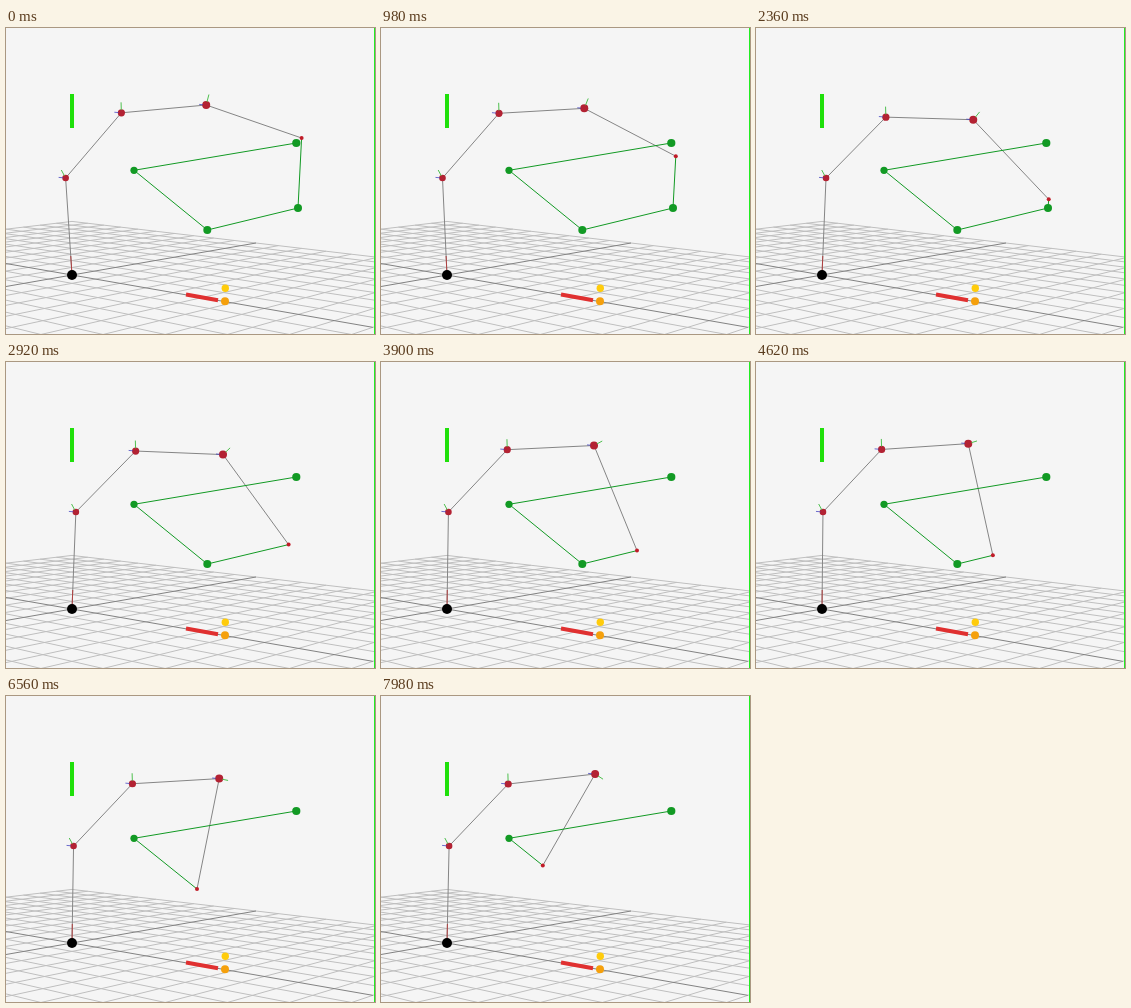
These frames come from a looping animation (369 by 306 pixels, 8 s). An HTML page with a canvas:

```html
<!DOCTYPE html>
<html lang="en">
<head>
<meta charset="utf-8">
<title>Robot arm following a path</title>
<style>
  html, body { margin: 0; width: 100%; height: 100%; overflow: hidden; background: #f5f5f5; }
  canvas { display: block; }
</style>
</head>
<body>
<canvas id="stage" width="369" height="306"></canvas>
<script>
const ctx = document.getElementById('stage').getContext('2d');
const LOOP = 8000;
const BASE = [66, 247];
const GREEN = '#129a24';
const JOINT = '#b32233';

// Ground plane: half size 1, seen along its diagonal.
const DEPTH = 4.15, HORIZON = 82.2, SCALE_X = 947.6, SCALE_Y = 684, CELLS = 10;

// Path corners, with the step at which the tip passes each one.
const path = [
  { at: 47, p: [292, 180], r: 4 },
  { at: 120.5, p: [201.3, 202], r: 4 },
  { at: Infinity, p: [128, 142.3], r: 3.6 },
  { at: Infinity, p: [290.3, 115], r: 4.1 }
];

// Step, tip x, tip y, wrist x, wrist y.
const poses = [
  [0, 295.6, 110, 200.2, 77],
  [28, 293.7, 152.5, 211, 85.6],
  [47, 292.3, 180, 220.8, 94.8],
  [53, 282.6, 182.6, 217, 92.6],
  [74, 256, 188.6, 213, 83.5],
  [106, 217.7, 198, 212.5, 83],
  [120.5, 201.3, 202, 212, 87.4],
  [131, 191, 193, 213.2, 82.6],
  [162, 161.8, 169.5, 214.1, 78],
  [164, 159.9, 168, 214.2, 77.8]
];

const lerp = (a, b, k) => a + (b - a) * k;

function line(points, color, width = 1) {
  ctx.beginPath();
  points.forEach(p => ctx.lineTo(p[0], p[1]));
  ctx.strokeStyle = color;
  ctx.lineWidth = width;
  ctx.stroke();
}

function dot([x, y], r, color) {
  ctx.beginPath();
  ctx.arc(x, y, r, 0, Math.PI * 2);
  ctx.fillStyle = color;
  ctx.fill();
}

function tick([x, y], dx, dy, color) {
  line([[x, y], [x + dx, y + dy]], color);
}

function ground(a, b) {
  const d = DEPTH + b - a;
  return [BASE[0] + SCALE_X * (a + b) / d, HORIZON + SCALE_Y / d];
}

function drawScene() {
  ctx.fillStyle = '#f5f5f5';
  ctx.fillRect(0, 0, 369, 306);
  for (let i = -CELLS; i <= CELLS; i++) {
    if (!i) continue;
    const k = i / CELLS;
    line([ground(k, -1), ground(k, 1)], '#bfbfbf');
    line([ground(-1, k), ground(1, k)], '#bfbfbf');
  }
  line([ground(0, -1), ground(0, 1)], '#828282');
  line([ground(-1, 0), ground(1, 0)], '#828282');

  ctx.fillStyle = '#1fe00a';
  ctx.fillRect(64, 66, 4, 34);
  ctx.fillStyle = '#22ee22';
  ctx.fillRect(368, 0, 1, 306);

  line([[180, 266.5], [212, 272.2]], '#e03030', 4);
  dot([219.3, 260.2], 3.7, '#ffcc0c');
  dot([219, 273.2], 4, '#f5a00c');
}

// Steps come in bursts of three, 20 ms apart, every 140 ms.
function stepAt(t) {
  if (t < 440) return 0;
  const burst = Math.floor((t - 540) / 140);
  const rest = t - 540 - burst * 140;
  return 2 + 3 * burst + Math.min(2, Math.floor(rest / 20));
}

function poseAt(n) {
  let i = 1;
  while (i < poses.length - 1 && poses[i][0] < n) i++;
  const a = poses[i - 1], b = poses[i];
  const k = (n - a[0]) / (b[0] - a[0]);
  const angleOf = q => Math.atan2(q[2] - q[4], q[1] - q[3]);
  const reachOf = q => Math.hypot(q[2] - q[4], q[1] - q[3]);
  const tip = [lerp(a[1], b[1], k), lerp(a[2], b[2], k)];
  const angle = lerp(angleOf(a), angleOf(b), k);
  const reach = lerp(reachOf(a), reachOf(b), k);
  const wrist = [tip[0] - reach * Math.cos(angle), tip[1] - reach * Math.sin(angle)];
  // The lower joints lean together with the wrist.
  const lean = wrist[0] - 200;
  const shoulder = [59.5 + 0.61 * lean, 150];
  const elbow = [115.2 + 0.85 * lean, 84.8 + 0.13 * lean + 0.007 * lean * lean];
  return { tip, angle, wrist, shoulder, elbow };
}

function drawArm(n) {
  const { tip, angle, wrist, shoulder, elbow } = poseAt(n);
  const left = path.filter(c => n < c.at);

  line([BASE, shoulder, elbow, wrist, tip], '#858585');
  line([tip, ...left.map(c => c.p)], GREEN);
  left.forEach(c => dot(c.p, c.r, GREEN));

  const up = 19 / (BASE[1] - shoulder[1]);
  line([BASE, [lerp(BASE[0], shoulder[0], up), BASE[1] - 19]], '#b04040');
  dot(BASE, 5, '#000');

  dot(shoulder, 3.3, JOINT);
  dot(elbow, 3.6, JOINT);
  dot(wrist, 4, JOINT);
  dot(tip, 2, '#c01c28');

  const g = angle - 1.6;
  for (const joint of [shoulder, elbow, wrist]) tick(joint, -7, -0.6, 'rgba(60,60,190,.75)');
  tick(shoulder, -4.3, -8, '#4fc04f');
  tick(elbow, -0.3, -10.5, '#4fc04f');
  tick(wrist, 9 * Math.cos(g), 11 * Math.sin(g), '#4fc04f');
  dot(shoulder, 2.6, JOINT);
  dot(elbow, 2.9, JOINT);
  dot(wrist, 3.3, JOINT);
}

function frame() {
  drawScene();
  drawArm(stepAt(performance.now() % LOOP));
  requestAnimationFrame(frame);
}
frame();
</script>
</body>
</html>
```
